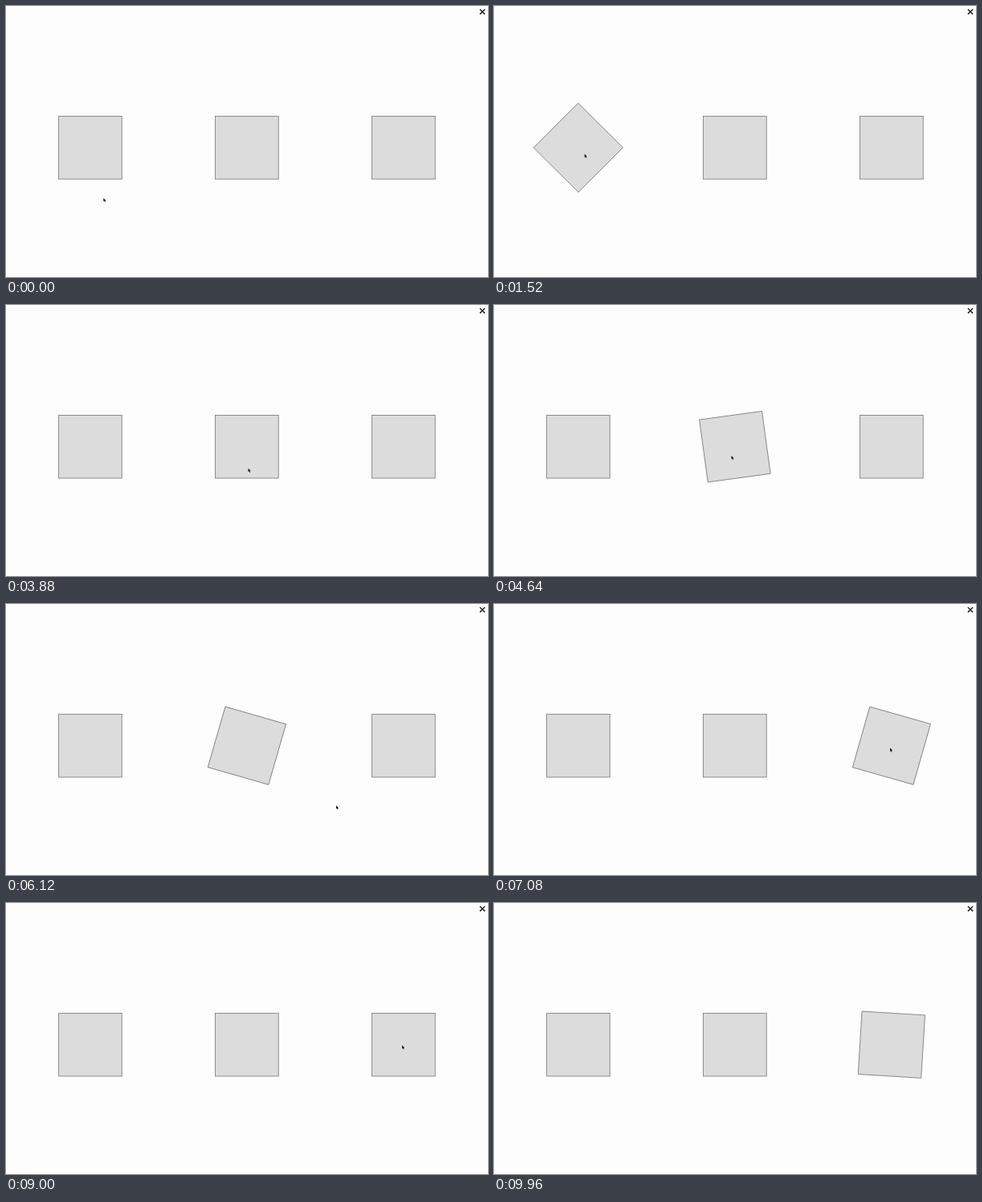
These frames come from a looping animation (600x338 px, 10 s). An HTML page:

```html
<!DOCTYPE html>
<html>
<head>
<meta charset="utf-8">
<style>
  html, body { margin: 0; width: 100%; height: 100%; overflow: hidden; background: #fdfdfd; }
  svg { display: block; width: 600px; height: 338px; }
  .box { fill: #dcdcdc; stroke: #757575; stroke-width: .8; }
</style>
</head>
<body>
<svg viewBox="0 0 600 338">
  <rect class="box" x="-39.3" y="-39.3" width="78.6" height="78.6"/>
  <rect class="box" x="-39.3" y="-39.3" width="78.6" height="78.6"/>
  <rect class="box" x="-39.3" y="-39.3" width="78.6" height="78.6"/>
  <path d="M589.9 4.1l6.2 6.2m0-6.2l-6.2 6.2" stroke="#000" stroke-width="1.3"/>
  <path id="cursor" d="M0 0V4.3L1 3.5L1.8 5.2L2.6 4.8L1.9 3.2H3.2Z" fill="#111"/>
</svg>
<script>
const LOOP = 10000, STEP = 40, TURN = 1000, HIDE = 9300;
const boxes = [
  { angle: 45, enter: 600, leave: 2730 },
  { angle: 180, enter: 3900, leave: 5869 },
  { angle: 360, enter: 6764, leave: 9090 }
];
// Pointer strokes, each starting where the last one ended; "bend" curves the path
const origin = [121.3, 239.5];
const moves = [
  { start: 360, end: 840, to: [112.7, 184.5] },
  { start: 2620, end: 3952, to: [295.5, 188], bend: [360, 343] },
  { start: 5780, end: 7040, to: [493, 179.6], bend: [552, 350] },
  { start: 8180, end: 8280, to: [493, 177.4] },
  { start: 9000, end: HIDE, to: [555, 296] }
];
const rects = document.querySelectorAll('.box');
const cursor = document.getElementById('cursor');
const mix = (a, b, k) => a.map((v, i) => v + (b[i] - v) * k);

// CSS "ease": cubic-bezier(.25, .1, .25, 1)
function ease(x) {
  if (x <= 0) return 0;
  if (x >= 1) return 1;
  let lo = 0, hi = 1, u;
  for (let i = 0; i < 24; i++) {
    u = (lo + hi) / 2;
    if (.75 * u * (1 - u) + u ** 3 < x) lo = u; else hi = u;
  }
  return .3 * u * (1 - u) ** 2 + 3 * u * u * (1 - u) + u ** 3;
}

function pointer(t) {
  let at = origin;
  for (const { start, end, to, bend } of moves) {
    if (t <= start) break;
    const k = Math.min(1, (t - start) / (end - start));
    at = bend ? mix(mix(at, bend, k), mix(bend, to, k), k) : mix(at, to, k);
  }
  return at;
}

function draw(now) {
  const t = Math.floor(now % LOOP / STEP) * STEP;
  boxes.forEach((b, i) => {
    const turn = b.angle * (ease((t - b.enter) / TURN) - ease((t - b.leave) / TURN));
    rects[i].setAttribute('transform', `translate(${104.9 + 195 * i} 176.7) rotate(${turn})`);
  });
  cursor.setAttribute('visibility', t < HIDE ? 'visible' : 'hidden');
  cursor.setAttribute('transform', `translate(${pointer(t)})`);
}

const start = performance.now();
function frame() {
  draw(performance.now() - start);
  requestAnimationFrame(frame);
}
frame();
</script>
</body>
</html>
```
